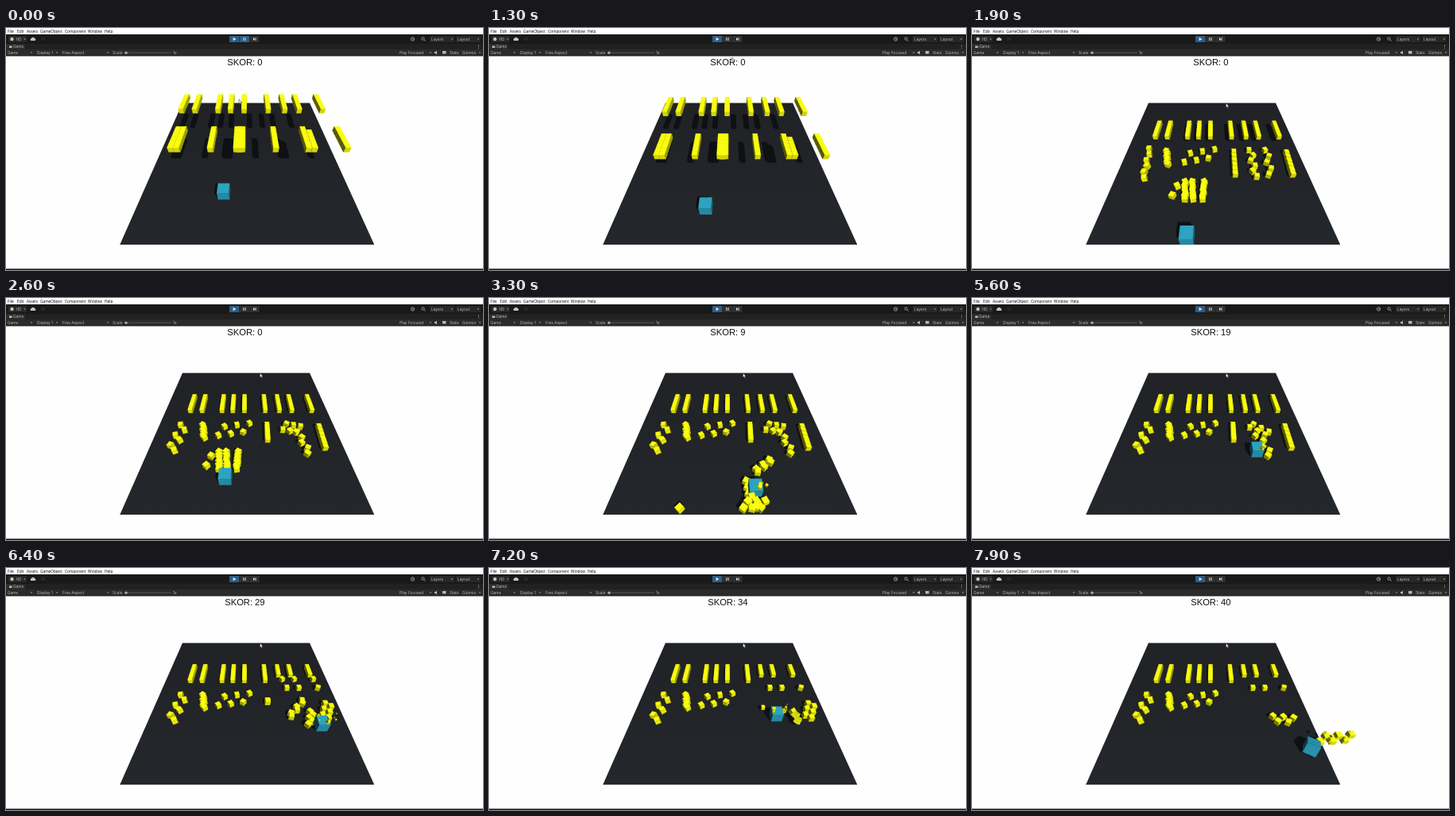
An HTML page with a canvas for the animation above (8 s loop, 600 by 305 pixels).

```html
<!DOCTYPE html>
<html lang="tr">
<head>
<meta charset="utf-8">
<title>Skor</title>
<style>
html, body { margin: 0; width: 100%; height: 100%; overflow: hidden; background: #fff; }
canvas, svg { position: absolute; left: 0; top: 0; width: 600px; height: 305px; }
text { font-family: "Open Sans", "Noto Sans", sans-serif; font-size: 4.8px; }
.bar text { fill: #b8b8b8; font-family: Inter, Roboto, sans-serif; }
#score { font: 11.2px "Liberation Sans", Arial, sans-serif; fill: #111; text-anchor: middle; }
</style>
</head>
<body>
<canvas id="scene"></canvas>
<svg viewBox="0 0 600 305">
  <g id="menu"><rect width="600" height="8" fill="#fff"/></g>
  <g class="bar" id="bars">
    <rect y="8" width="600" height="12" fill="#191919"/>
    <rect y="20" width="600" height="7.5" fill="#212121"/>
    <rect y="20" width="24" height="7.5" fill="#2d2d2d"/>
    <rect y="27" width="600" height="8" fill="#2b2b2b"/>
    <rect y="34.5" width="600" height="1" fill="#1c1c1c"/>
    <rect x="3" y="10" width="23" height="8" rx="1" fill="#282828"/>
    <circle cx="7.5" cy="14" r="2.2" fill="#c4c4c4"/>
    <path d="M31.5 16a1.6 1.6 0 0 1 .5-3 2.2 2.2 0 0 1 4 0 1.6 1.6 0 0 1 .5 3z" fill="#c4c4c4"/>
    <rect x="44" y="12" width="5" height="4" fill="#262626"/>
    <rect x="281" y="10" width="12.3" height="8" fill="#2c5d87"/>
    <rect id="pause" x="293.6" y="10" width="12.3" height="8"/>
    <rect x="306.2" y="10" width="12.3" height="8" fill="#303030"/>
    <path d="M285.6 11.8l4 2.2-4 2.2z M311 12l2.4 2-2.4 2z M313.6 12h.9v4h-.9z" fill="#ddd"/>
    <path d="M298.3 12h1v4h-1z M300.5 12h1v4h-1z" fill="#ddd"/>
    <rect x="533" y="10" width="31" height="8" fill="#282828"/>
    <rect x="566" y="10" width="31" height="8" fill="#282828"/>
    <g fill="none" stroke="#c4c4c4" stroke-width=".7">
      <circle cx="511.5" cy="14" r="2.2"/><path d="M511.5 12.8v1.4h1.2"/>
      <circle cx="524.5" cy="13.5" r="1.7"/><path d="M525.8 14.8l1.8 1.8"/>
      <path d="M150 31.2h58" stroke="#666"/>
    </g>
    <circle cx="151" cy="31.2" r="1.7" fill="#aaa"/>
    <path d="M4 22.6h3.6v2.4H4z M539 30h1.4l1.6-1.4v5L540.4 32H539z M549 29h4.5v3.6H549z" fill="#b8b8b8"/>
    <path d="M594 21.6h.8v.8h-.8z M594 23.3h.8v.8h-.8z M594 25h.8v.8h-.8z" fill="#c4c4c4"/>
  </g>
  <rect y="303.4" width="600" height="1.6" fill="#1b1b1b"/>
  <text id="score" x="300.4" y="47.2">SKOR: 0</text>
  <path id="cursor" d="M0 0v5.2l1.2-1 .9 1.9.9-.4-.9-1.8h1.6z" fill="#fff" stroke="#222" stroke-width=".5"/>
</svg>
<script>
const LOOP = 8000, STEP = 100;
const $ = id => document.getElementById(id);
const clamp = v => Math.max(0, Math.min(1, v));
const mix = (a, b, u) => a + (b - a) * u;
const rand = n => { const v = Math.sin(n * 127.1 + 3.7) * 43758.5453; return v - Math.floor(v); };
const times = (n, f) => Array.from({ length: n }, (_, i) => f(i));

// Editor labels
function add(parent, tag, attrs) {
  const el = document.createElementNS("http://www.w3.org/2000/svg", tag);
  for (const k in attrs) el.setAttribute(k, attrs[k]);
  return parent.appendChild(el);
}
const label = (parent, y, items) =>
  items.forEach(([x, s]) => { add(parent, "text", { x, y }).textContent = s; });
const arrows = (y, xs) =>
  xs.forEach(x => add($("bars"), "path", { d: `M${x - 1.3} ${y}h2.6l-1.3 1.6z`, fill: "#a8a8a8" }));
label($("menu"), 5.8, [[2, "File"], [14, "Edit"], [26, "Assets"], [43, "GameObject"], [74, "Component"], [103, "Window"], [124, "Help"]]);
label($("bars"), 15.7, [[12.5, "HD"], [535, "Layers"], [568, "Layout"]]);
label($("bars"), 25.4, [[9, "Game"]]);
label($("bars"), 32.7, [[2, "Game"], [39, "Display 1"], [71, "Free Aspect"], [134, "Scale"], [210, "1x"],
  [495, "Play Focused"], [558, "Stats"], [574, "Gizmos"]]);
arrows(13.4, [23.5, 561, 594]);
arrows(30.5, [32, 64, 128, 534, 596]);

// Camera
const H = 15.13, F = 232, CX = 302.5, CY = 169, PITCH = 0.8308;
const CP = Math.cos(PITCH), SP = Math.sin(PITCH);
const SUN = [-0.321, -0.766, 0.557];
function project([x, y, z]) {
  const k = F / (z * CP + (H - y) * SP);
  return [CX + x * k, CY + ((H - y) * CP - z * SP) * k];
}
function unproject(sx, sy, y) {
  const z = (H - y) / Math.tan(PITCH + Math.atan((sy - CY) / F));
  return [(sx - CX) * (z * CP + (H - y) * SP) / F, y, z];
}

// Boxes
const SIZE = 0.52, PLAYER = 1.08;
const YELLOW = [250, 252, 16], BLUE = [45, 163, 193];
const CORNERS = times(8, i => [i & 1 ? 1 : -1, i & 2 ? 1 : -1, i & 4 ? 1 : -1]);
const FACES = [[0, 1, 3, 2], [4, 5, 7, 6], [0, 1, 5, 4], [2, 3, 7, 6], [0, 2, 6, 4], [1, 3, 7, 5]];
const NORMALS = [[0, 0, -1], [0, 0, 1], [0, -1, 0], [0, 1, 0], [-1, 0, 0], [1, 0, 0]];
const dot = (a, b) => a[0] * b[0] + a[1] * b[1] + a[2] * b[2];

function turn([x, y, z], yaw, tilt) {
  const c = Math.cos(tilt), s = Math.sin(tilt), C = Math.cos(yaw), S = Math.sin(yaw);
  const y2 = y * c - z * s, z2 = y * s + z * c;
  return [x * C + z2 * S, y2, z2 * C - x * S];
}
const corners = b => CORNERS.map(c => turn(c, b.yaw, b.tilt).map((v, i) => b.pos[i] + v * b.size / 2));

const canvas = $("scene"), ctx = canvas.getContext("2d");
const dpr = window.devicePixelRatio || 1;
canvas.width = 600 * dpr;
canvas.height = 305 * dpr;
ctx.scale(dpr, dpr);

function trace(points) {
  ctx.beginPath();
  points.forEach(p => ctx.lineTo(p[0], p[1]));
  ctx.closePath();
}
function hull(points) {
  const pts = [...points].sort((a, b) => a[0] - b[0] || a[1] - b[1]);
  const half = list => {
    const out = [];
    for (const p of list) {
      while (out.length > 1) {
        const [a, b] = out.slice(-2);
        if ((b[0] - a[0]) * (p[1] - a[1]) - (b[1] - a[1]) * (p[0] - a[0]) > 0) break;
        out.pop();
      }
      out.push(p);
    }
    return out.slice(0, -1);
  };
  return [...half(pts), ...half(pts.reverse())];
}
function drawShadow(b) {
  const ground = corners(b).map(p => {
    const k = Math.max(0, p[1]) / -SUN[1];
    return project([p[0] + SUN[0] * k, 0, p[2] + SUN[2] * k]);
  });
  trace(hull(ground));
  ctx.fill();
}
function drawBox(b) {
  const pts = corners(b);
  FACES.forEach((f, i) => {
    const n = turn(NORMALS[i], b.yaw, b.tilt);
    const mid = n.map((v, j) => b.pos[j] + v * b.size / 2);
    if (dot(n, [-mid[0], H - mid[1], -mid[2]]) <= 0) return;
    const light = Math.min(1, 0.34 + 0.9 * Math.max(0, -dot(n, SUN)));
    ctx.fillStyle = ctx.strokeStyle = `rgb(${b.color.map(v => Math.round(v * light))})`;
    trace(f.map(j => project(pts[j])));
    ctx.fill();
    ctx.stroke();
  });
}

// Key points: time, then values
const ROUTE = [[0, 274, 206], [1000, 274, 206], [1900, 270.5, 261], [2600, 276, 225], [3000, 316, 222], [3300, 335, 239],
  [4200, 252, 262], [4900, 330, 253], [5600, 358, 191], [6400, 397, 196], [7100, 352, 178], [7900, 427, 225]];
const SCORE = [[0, 0], [2800, 0], [3300, 9], [4200, 15], [5400, 19], [5700, 19], [6400, 29], [7900, 40]];
const POINTER = [[0, 293, 90], [500, 322, 48], [800, 300, 14], [1100, 300, 14], [1800, 319.5, 94.8]];
function along(route, t) {
  const i = route.findIndex(k => k[0] > t);
  if (i < 0) return route[route.length - 1].slice(1);
  const a = route[i - 1], b = route[i], u = (t - a[0]) / (b[0] - a[0]);
  return a.slice(1).map((v, j) => mix(v, b[j + 1], u));
}
function player(t) {
  const [x, y] = along(ROUTE, t), late = clamp((t - 7200) / 700);
  return { pos: unproject(x, y, PLAYER / 2), size: PLAYER, yaw: late / 2, tilt: late * 0.4, color: BLUE };
}

// Yellow cubes: dropped as bars, then moved from stop to stop
const cubes = [];
const BACK = { start: 1040, end: 1965, top: 4.2, speed: 0 };
const FRONT = { start: 1000, end: 1700, top: 3.5, speed: 1.57 };
const stop = (t, x, y, lift = 0) => ({ t, pos: unproject(x, y, lift + SIZE / 2) });
const collect = t => ({ t, gone: true });
function addCube(x, z, drop, stops, loose) {
  const home = { t: drop.end, pos: [x, SIZE / 2, z] };
  cubes.push({ home, drop, keys: [home, ...stops], spin: loose ? (rand(cubes.length) - 0.5) * 1.1 : 0 });
}

// The last three back bars lose their two nearest cubes
[235, 249, 273, 286, 300, 325, 342, 357, 381].forEach((x, b) => times(6, i => {
  const breaks = b > 5 && i < 2;
  const stops = !breaks ? [] : i ? [stop(6300, x + 5, 140), collect(7000)] : [stop(6300, x + 11, 151)];
  addCube(unproject(x, 132.5, SIZE / 2)[0], 17.25 + SIZE * i, BACK, stops, breaks);
}));

// A row places n cubes on a screen line with a zigzag of (zx, zy)
const row = (t, from, to, zx = 0, zy = 0, lift = 0) => ({ t, from, to, zx, zy, lift });
function frontBar(x, rows, { n = 6, eaten, loose = true } = {}) {
  times(n, i => {
    const u = i / (n - 1), side = i % 2 ? 1 : -1;
    const stops = rows.map(r => stop(r.t, mix(r.from[0], r.to[0], u) + side * r.zx,
      mix(r.from[1], r.to[1], u) - side * r.zy, r.lift));
    if (eaten) stops.push(collect(mix(eaten[0], eaten[1], u)));
    addCube(unproject(x, 138, 3.76)[0], 12.1 + SIZE * (n - 1 - i), FRONT, stops, loose);
  });
}
frontBar(213.5, [row(1900, [224, 152], [216, 189], 1), row(2300, [224, 160], [208, 192], 4)]);
frontBar(220.5, [row(1900, [245, 155], [246, 172], 0.5), row(2300, [248, 160], [249, 176], 0.5)]);
frontBar(260, [row(1900, [267, 164], [305, 158], 0, 5), row(2300, [267, 168], [306, 163], 0, 5)]);
frontBar(290.5, [row(1900, [268, 194], [268, 215]), row(2600, [268, 194], [268, 215]),
  row(3300, [355, 204], [335, 219], 3), row(4200, [249, 238], [253, 255], 3, 0, 1.2)], { eaten: [4400, 4900] });
frontBar(297.5, [row(1900, [277, 194], [278, 215]), row(2600, [277, 194], [278, 215]),
  row(3300, [320, 261], [347, 260], 0, 4), row(4200, [321, 262], [349, 262], 0, 3)], { eaten: [4750, 5050] });
frontBar(294, [row(1900, [292, 194], [290, 215]), row(2600, [292, 194], [290, 215]),
  row(3300, [325, 231], [329, 251], 1.5)], { eaten: [3500, 4400] });
frontBar(294, [row(1900, [252, 211], [258, 199]), row(2600, [252, 211], [258, 199]),
  row(3300, [240, 265], [336, 263])], { n: 2, eaten: [4500, 4850] });
frontBar(337, [row(1900, [329, 156], [331, 184]), row(2300, [328, 160], [329, 178]),
  row(6300, [329, 168], [329, 168])], { eaten: [7300, 7300], loose: false });
frontBar(375.5, [row(1900, [350, 154], [356, 187], 2), row(2300, [348, 162], [370, 166], 0, 4),
  row(5600, [349, 160], [373, 172], 0, 3), row(6400, [374, 167], [357, 187], 2)], { eaten: [6850, 7050] });
frontBar(382.5, [row(1900, [370, 154], [375, 185], 2), row(2300, [366, 169], [381, 196], 2),
  row(5600, [359, 174], [375, 199], 3), row(6400, [384, 181], [382, 197], 2),
  row(7700, [378, 190], [404, 192], 0, -3)], { n: 5 });
frontBar(421, [row(1900, [395, 157], [403, 184]), row(2300, [393, 162], [401, 188]), row(5700, [393, 162], [401, 188]),
  row(6400, [405, 171], [401, 189], 4), row(7900, [437, 216], [476, 213], 0, 3)], { loose: false });

function cubeAt(c, t, hero) {
  const box = { pos: [...c.home.pos], size: SIZE, yaw: 0, tilt: 0, color: YELLOW };
  const { start, end, top, speed } = c.drop;
  if (t < end) {
    const s = Math.max(0, t - start) / 1000;
    box.pos[1] += Math.max(0, top - speed * s - 4.905 * s * s);
    return box;
  }
  let i = 0;
  while (i + 1 < c.keys.length && c.keys[i + 1].t <= t) i++;
  const a = c.keys[i], b = c.keys[i + 1];
  if (a.gone) return null;
  box.pos = [...a.pos];
  box.yaw = c.spin * Math.min(i, 2);
  if (!b) return box;
  const from = Math.max(a.t, b.t - (b.gone ? 200 : 700));
  const u = clamp((t - from) / (b.t - from)), goal = b.gone ? hero.pos : b.pos;
  box.pos = a.pos.map((v, j) => mix(v, goal[j], u));
  box.pos[1] += Math.sin(Math.PI * u) * Math.abs(c.spin);
  box.yaw = c.spin * mix(Math.min(i, 2), Math.min(i + 1, 2), u);
  box.tilt = Math.sin(Math.PI * u) * c.spin * 2;
  if (b.gone) box.size *= 1 - 0.8 * u;
  return box;
}

// Small chips thrown off by the player
function chips(t, hero) {
  const late = clamp((t - 7200) / 700);
  return times(t < 3000 ? 0 : t < 5400 ? 3 : t < 6000 ? 5 : 9, i => {
    const p = (t / 500 + rand(i + 40)) % 1, reach = 0.5 + p * 0.9;
    return {
      pos: [hero.pos[0] + (rand(i + 60) - 0.45) * 2 * reach + late * (0.6 + p * 1.6),
        0.9 + p * 0.8, hero.pos[2] + (rand(i + 80) - 0.4) * reach + late * 0.5],
      size: 0.06 + 0.25 * (1 - p), yaw: i + p * 3, tilt: p * 4, color: YELLOW
    };
  });
}

const FLOOR = [[222, 94.5], [382, 94.5], [463, 272.5], [143.5, 272.5]];
const ground = ctx.createLinearGradient(0, 94, 0, 273);
ground.addColorStop(0, "#202226");
ground.addColorStop(1, "#24272b");

function render(t) {
  const hero = player(t);
  const boxes = [hero, ...cubes.map(c => cubeAt(c, t, hero)).filter(Boolean), ...chips(t, hero)];
  const far = b => Math.hypot(b.pos[0], H - b.pos[1], b.pos[2]);
  boxes.sort((a, b) => far(b) - far(a));

  ctx.fillStyle = "#fefefe";
  ctx.fillRect(0, 0, 600, 305);
  ctx.save();
  trace(FLOOR);
  ctx.fillStyle = ground;
  ctx.fill();
  ctx.clip();
  ctx.fillStyle = "#0e1013";
  boxes.forEach(drawShadow);
  ctx.restore();
  ctx.fillStyle = "#121417";
  ctx.fillRect(143.5, 272.2, 319.5, 0.9);
  ctx.lineWidth = 0.2;
  boxes.forEach(drawBox);

  $("score").textContent = "SKOR: " + Math.floor(along(SCORE, t)[0] + 1e-6);
  $("pause").setAttribute("fill", t < 1000 ? "#2c5d87" : "#303030");
  const [x, y] = along(POINTER, t);
  $("cursor").setAttribute("transform", `translate(${x} ${y})`);
}

const t0 = performance.now();
let last = -1;
function tick() {
  const t = Math.floor(((performance.now() - t0) % LOOP) / STEP) * STEP;
  if (t !== last) render(last = t);
  requestAnimationFrame(tick);
}
tick();
</script>
</body>
</html>
```
